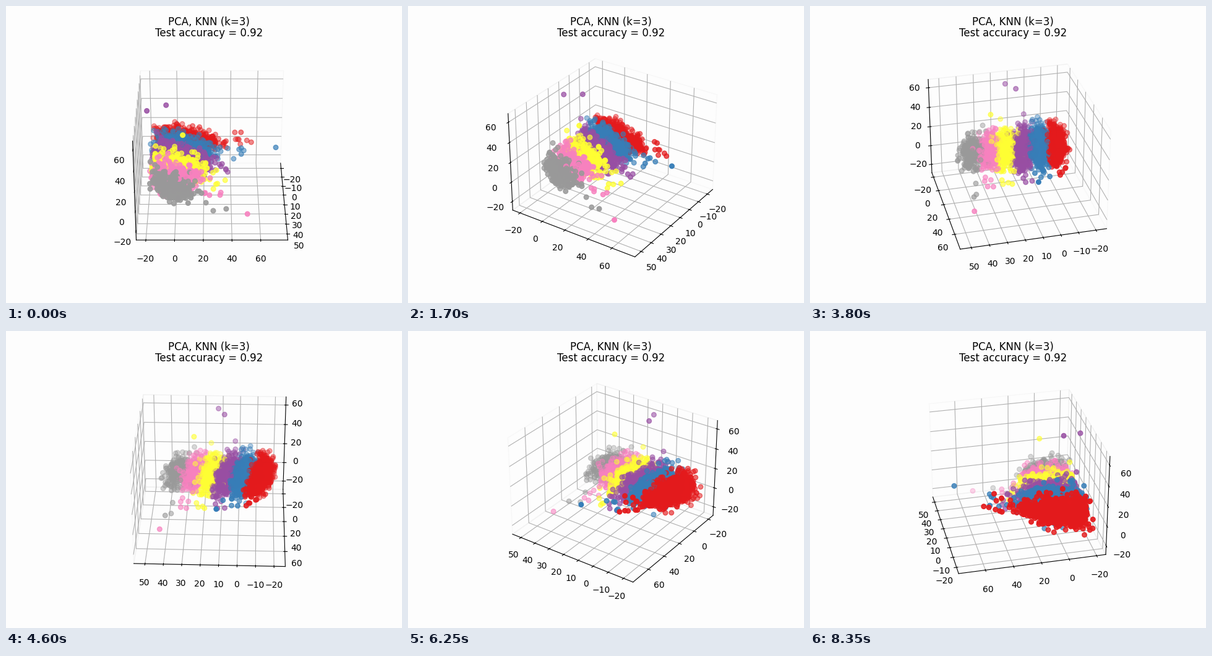
These frames come from a looping animation (640x480 px, 8400 ms). A matplotlib script:

```python
import numpy as np
import matplotlib.pyplot as plt
from matplotlib.animation import FuncAnimation

FRAMES, INTERVAL = 168, 50
PAPER = "#fdfdfd"
COLORS = ["#e41a1c", "#377eb8", "#984ea3", "#ffff33", "#f781bf", "#999999"]

# lone points far from every cloud: class, (x, y, z)
LANDMARKS = [(1, (11.5, 72, 22)), (2, (12.5, -20, 59.5)), (2, (8.8, -6.5, 62)),
             (3, (25.7, 5.6, 47)), (4, (43.4, 51, -15.5))]

rng = np.random.default_rng(4)


def cluster(k):
    """Dense cloud of class k plus a sparse tail towards high y."""
    n, tail = int(950 * 0.76 ** k), 8 - k
    y = -19.5 + (63 - 3.6 * k) * rng.beta(2.7, 4.4, n)
    spread = (7.4 - 0.22 * (k - 2) ** 2) * (1 - y / 80)
    z = 6.5 - 0.4 * k + (0.1 - 0.04 * k) * y + spread * rng.normal(size=n)

    y = np.append(y, rng.uniform(36, 58, tail) - 4 * k)
    z = np.append(z, 16 - 6 * k + 4 * rng.normal(size=tail))
    x = -13.3 + 9.8 * k + 0.17 * y + (2.5 + 0.2 * k) * rng.normal(size=n + tail)
    return np.column_stack([x.clip(-20.8, 50.8), y, z.clip(-22, 38)])


clusters = [cluster(k) for k in range(len(COLORS))]
points = np.vstack(clusters + [p for _, p in LANDMARKS])
colors = [COLORS[k] for k, c in enumerate(clusters) for _ in c]
colors += [COLORS[k] for k, _ in LANDMARKS]

fig = plt.figure(figsize=(6.4, 4.8), dpi=100, facecolor=PAPER)
ax = fig.add_subplot(projection="3d", facecolor=PAPER)
ax.scatter(*points.T, c=colors, s=30)
ax.set_title("PCA, KNN (k=3)\nTest accuracy = 0.92", y=1, linespacing=1.0)
ax.title.set_y(1)  # 3D axes lower their title otherwise

ax.set_xticks(range(-20, 51, 10))
ax.set_yticks(range(-20, 61, 20))
ax.set_zticks(range(-20, 61, 20))
ax.set_xlim(-26.1, 56.1)
ax.set_ylim(-26.7, 78.9)
ax.set_zlim(-29.1, 68.3)
for axis in (ax.xaxis, ax.yaxis, ax.zaxis):
    axis.pane.fill = False


def turn(i):
    # the nudge keeps the side panes stable when the view is square-on
    nudge = 1e-3 if i < 90 else -1e-3
    ax.view_init(elev=30, azim=i + nudge)
    return ()


anim = FuncAnimation(fig, turn, frames=FRAMES, interval=INTERVAL,
                     init_func=lambda: turn(0), repeat=True, repeat_delay=0)
plt.show()
```
